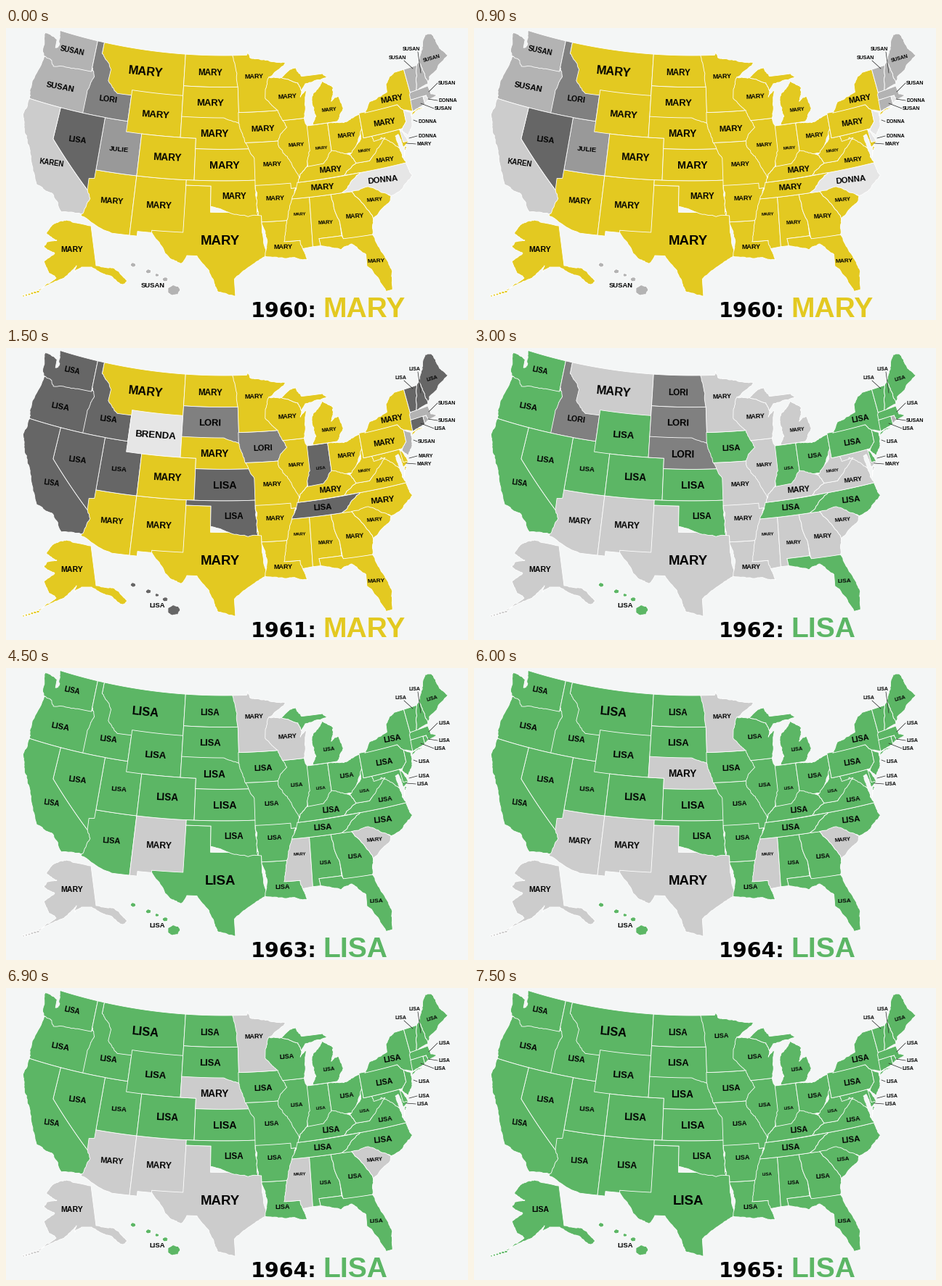
A matplotlib script for the animation above (8000 ms loop, 636 px wide and 403 px high).

```python
import numpy as np
import matplotlib.pyplot as plt
from matplotlib.animation import FuncAnimation
from matplotlib.patches import Polygon

W, H, DPI = 636, 403, 100
BG = "#f4f6f6"
YELLOW, GREEN = "#e3c921", "#5cb665"
GREYS = {"MARY": "#cccccc", "SUSAN": "#b3b3b3", "LORI": "#808080",
         "LISA": "#666666", "JULIE": "#999999", "KAREN": "#cccccc",
         "DONNA": "#e6e6e6", "BRENDA": "#e6e6e6"}

fig = plt.figure(figsize=(W / DPI, H / DPI), dpi=DPI, facecolor=BG)
ax = fig.add_axes([0, 0, 1, 1])
ax.set_xlim(0, W)
ax.set_ylim(H, 0)
ax.axis("off")

parts, labels = {}, {}


def conic(pts):
    """Equal-area conic from west longitude and latitude to the stage,
    bent slightly towards the outer edges."""
    lon, lat = pts.T
    n, c = 0.602835, 1.35122
    rho = np.sqrt(c - 2 * n * np.sin(np.radians(lat))) / n
    a = np.radians(n * (98.4 - lon))
    x = 300.4 + 815 * rho * np.sin(a)
    y = 815 * rho * np.cos(a) - 858.5
    u = (x - 300) / 280
    west, east = np.minimum(u, 0), np.maximum(u, 0)
    return np.column_stack([
        x + 3 * west * (y / 150 - 0.6) - 2 * east**2,
        y - 8 * u**2 * (1 - y / 240) + (y - 200) / 100])


def edge(a, b, place):
    """Surveyed or long borders run straight, rivers and coasts wander.
    The wander depends on the two ends only, so neighbours share it."""
    p, q = sorted((tuple(a), tuple(b)))
    p, q = np.array(p), np.array(q)
    t = np.linspace(0, 1, 13)[:, None]
    xy = place(p + (q - p) * t)
    d = xy[-1] - xy[0]
    size = np.hypot(*d)
    if np.abs(q - p).min() > 0.12 and size < 54:
        rng = np.random.default_rng(int(100 * (7 * p + 13 * q).sum()))
        walk = np.r_[0, rng.normal(0, 0.09 * np.sqrt(size), 12).cumsum()]
        walk -= walk[-1] * t[:, 0]
        xy = xy + np.outer(walk, [-d[1], d[0]]) / size
    return xy if tuple(a) == tuple(p) else xy[::-1]


def piece(key, *pts, place=conic):
    p = np.reshape(pts, (-1, 2)).astype(float)
    xy = np.vstack([edge(a, b, place) for a, b in zip(p, np.roll(p, -1, 0))])
    patch = Polygon(xy, closed=True, ec="white", lw=0.6, joinstyle="round")
    parts.setdefault(key, []).append(ax.add_patch(patch))


def blob(key, x, y, r):
    a = np.arange(0, 2 * np.pi, 0.9)
    piece(key, *np.column_stack([x + r * np.cos(a),
                                 y + 0.8 * r * np.sin(a)]).ravel(),
          place=np.array)


def write(x, y, size, rot=0, ha="center", font="Liberation Sans"):
    return ax.text(x, y, "", family=font, weight="bold", size=size * 72 / DPI,
                   rotation=rot, ha=ha, rotation_mode="anchor", zorder=5)


def tag(key, x, y, size, rot=0, ha="center"):
    labels[key] = write(x, y + 0.345 * size, size, rot, ha)


def state(key, label, *pts):
    """Label is x, y and size; its tilt follows the curve of the map."""
    piece(key, *pts)
    x, y, size = label
    tag(key, x, y, size, 0.06 * (x - 300) * (1 - y / 400))


def box(key, label, w, n, e, s):
    state(key, label, w, n, e, n, e, s, w, s)


# Later states cover the rough sides of earlier ones.
# West
state("OR", (74, 81, 11.2), 123.9, 46.2, 116.5, 46.1, 116.5, 42, 124.2, 42,
      124.5, 42.8)
state("WA", (90, 31, 9.8), 124.7, 48.35, 122.8, 48.1, 122.7, 47.3,
      122.3, 47.6, 122.5, 48.4, 122.76, 49, 117.03, 49, 117.03, 46, 119, 45.95,
      122.3, 45.55, 122.9, 46.1, 124, 46.25)
box("MT", (192, 60, 16.5), 116.05, 49, 104.05, 44.4)
state("AZ", (145, 238, 11), 114.8, 37, 109.05, 37, 109.05, 31.33,
      111.07, 31.33, 114.8, 32.5)
box("UT", (155, 167, 9.5), 114.05, 42, 109.05, 37)
state("ID", (140, 98, 10.6), 117.03, 49, 116.05, 49, 116.05, 47.9,
      114.4, 46.6, 114.5, 45.5, 113, 44.45, 111.05, 44.5, 111.05, 42,
      117.03, 42, 117.03, 44, 116.5, 45.6, 117.03, 46.4)
box("WY", (205, 119, 13.3), 111.05, 45, 104.05, 41)
state("NV", (98, 154, 11), 120, 42, 114.05, 42, 114.05, 36.2, 114.7, 36.1,
      114.63, 35, 120, 39)
state("CA", (62, 186, 9.6), 124.2, 42, 120, 42, 120, 39, 114.63, 35,
      114.14, 34.26, 114.7, 32.72, 117.12, 32.53, 118.5, 34, 120.6, 34.5,
      122.4, 37.4, 123.8, 39.2, 124.4, 40.3)
state("NM", (210, 244, 12.3), 109.05, 37, 103, 37, 103, 31.78, 108.2, 31.78,
      108.2, 31.33, 109.05, 31.33)
box("CO", (222, 178, 13.5), 109.05, 41, 102.05, 37)

# Plains
box("ND", (281, 61, 11.6), 104.05, 49, 96.5, 45.94)
box("SD", (281, 103, 13), 104.05, 45.94, 96.45, 42.5)
box("IA", (354, 138, 11.3), 96.5, 43.5, 90.2, 40.59)
box("MO", (366, 187, 9), 95.8, 40.59, 89.2, 36)
state("TX", (295, 293, 18.7), 103, 36.5, 100, 36.5, 100, 34, 94.04, 34,
      94.04, 32, 93.6, 29.8, 95.2, 29, 97.3, 27.6, 97.2, 25.95, 99.1, 26.4,
      99.6, 27.6, 101.4, 29.8, 102.5, 29.8, 103.1, 29, 104.5, 29.6,
      106.6, 31.8, 106.6, 32, 103.06, 32)
state("NE", (287, 146, 13.5), 104.05, 43, 98.5, 43, 96.5, 42.5, 95.8, 40.9,
      95.3, 40, 102.05, 40, 102.05, 41, 104.05, 41)
state("KS", (301, 189, 14.3), 102.05, 40, 95.3, 40, 94.61, 39.1, 94.62, 37,
      102.05, 37)
state("OK", (314, 232, 11.6), 103, 37, 94.62, 37, 94.45, 33.65, 97.2, 33.8,
      100, 34.56, 100, 36.5, 103, 36.5)

# Midwest
state("MN", (341, 66, 9), 97.2, 49, 95.15, 49, 95, 49.35, 94.6, 48.7,
      92, 48.35, 89.6, 48, 92.1, 46.75, 91.2, 43.5, 96.45, 43.5, 96.5, 45.94)
box("IN", (434, 165, 6.2), 88, 41.74, 84.8, 37.8)
state("IL", (400, 161, 7.8), 90.65, 42.5, 87.8, 42.5, 87.53, 41.7,
      87.53, 39.35, 88.1, 37.9, 89.1, 37, 90.2, 38.7, 91.4, 40, 91.1, 41.2,
      90.2, 41.8)
state("WI", (387, 94, 9), 92.1, 46.75, 90.4, 46.6, 88.1, 45.9, 87.7, 45.1,
      88, 44.55, 87.1, 45.1, 87.8, 42.5, 90.65, 42.5, 91.2, 43.5, 92.8, 44.75,
      92.7, 45.6)
state("MI", (445, 112, 7.3), 86.8, 41.76, 83.45, 41.73, 82.45, 42.9,
      82.9, 44.05, 83.9, 43.7, 83.4, 45, 84.7, 45.75, 86.2, 44.7, 86.5, 43.7,
      86.2, 42.5)
piece("MI", 90.4, 46.6, 88.2, 47.4, 87.5, 46.5, 84.6, 46.45, 84, 46,
      87, 45.75, 87.7, 45.1, 88.1, 45.9)
state("OH", (469, 148, 8.8), 84.8, 41.7, 82.7, 41.5, 80.52, 41.97,
      80.52, 40.6, 82.2, 38.5, 84.8, 38.7)

# South
state("LA", (381, 302, 9), 94.04, 33, 91, 33, 91.4, 31, 89.75, 31, 89.5, 30,
      89.1, 29.1, 91.3, 29.4, 93.85, 29.72, 93.5, 31.1)
state("AR", (370, 234, 9), 94.62, 36.5, 90.3, 36.5, 90.3, 36, 89.7, 36,
      91.1, 33, 94.04, 33, 94.04, 33.6, 94.45, 33.65)
state("MS", (404, 257, 6.2), 90.3, 35, 88.2, 35, 88.4, 30.3, 89.55, 30.2,
      89.75, 31, 91.6, 31, 91.1, 33)
state("AL", (440, 268, 7.3), 88.2, 35, 85.6, 35, 85, 32.3, 85, 31, 87.6, 31,
      87.5, 30.3, 88.4, 30.3)
state("GA", (480, 259, 8.8), 85.6, 35, 83.1, 35, 81.1, 32.1, 81.5, 30.65,
      84.9, 30.6, 85, 32.3)
state("FL", (510, 321, 8.4), 87.6, 31, 85, 31, 84.86, 30.7, 81.5, 30.65,
      80.55, 28.4, 80.05, 26.9, 80.4, 25.2, 81.1, 25.15, 82.7, 27.8,
      82.6, 28.9, 84, 30.1, 85.3, 29.7, 87.5, 30.3)
state("NC", (519, 209, 11.4), 84.3, 35, 81, 34.9, 78.55, 33.87, 76.5, 34.7,
      75.55, 35.25, 75.9, 36.55, 81.68, 36.59)
state("SC", (508, 236, 7.8), 83.1, 35, 81, 35.15, 78.55, 33.87, 79.2, 33.2,
      81.1, 32.1)
state("MD", (565, 160, 7), 79.48, 39.72, 75.79, 39.72, 75.05, 38.45, 75.8, 38,
      76.1, 39.3, 76.5, 39.2, 76.3, 38.1, 77.2, 38.4, 79.48, 39.2)
state("VA", (522, 181, 8.8), 83.67, 36.6, 75.9, 36.55, 76.3, 37.9, 77.1, 38.7,
      78.3, 39.4, 80.3, 37.5, 81.97, 37.54)
piece("VA", 75.95, 37.15, 75.4, 38, 75.7, 38)
state("TN", (436, 219, 11.3), 90.3, 35, 84.3, 35, 81.68, 36.59, 89.5, 36.5)
state("KY", (447, 195, 10.8), 89.4, 36.5, 83.67, 36.6, 81.97, 37.54,
      82.6, 38.4, 84.8, 39.1, 86, 38, 88.1, 37.9, 89.1, 37)
state("WV", (494, 169, 6.4), 80.52, 40.64, 80.52, 39.72, 79.48, 39.72,
      79.3, 39.2, 77.8, 39.3, 80.3, 37.5, 81.97, 37.54, 82.6, 38.4,
      80.85, 39.7)

# Northeast
state("PA", (521, 130, 10.5), 80.52, 42.1, 75.35, 42, 74.7, 41.35,
      74.75, 40.2, 75.5, 39.72, 80.52, 39.72)
state("NY", (532, 97, 10.8), 79.76, 42, 78.9, 42.9, 76.3, 43.4, 76.2, 44.1,
      74.8, 45, 73.35, 45, 73.3, 42.5, 73.6, 41, 74.7, 41.35, 75.35, 42)
piece("NY", 74, 40.6, 71.9, 41.07, 73.7, 40.9)
state("ME", (587, 41, 7), 71.08, 45.3, 70.1, 46.4, 69.2, 47.45, 68.3, 47.3,
      67.8, 45.7, 67, 44.85, 70.2, 43.6, 70.7, 43)
piece("DE", 75.79, 39.72, 75.05, 38.45, 75.7, 38.46)
piece("NJ", 74.7, 41.35, 73.95, 41, 74.1, 39.75, 74.9, 38.95, 75.5, 39.5,
      74.75, 40.2)
piece("VT", 73.35, 45, 71.5, 45, 72.46, 42.73, 73.3, 42.75)
piece("NH", 71.5, 45, 71.08, 45.3, 70.7, 43, 72.46, 42.73)
piece("MA", 73.3, 42.75, 70.8, 42.8, 70.7, 42, 69.95, 41.7, 71.2, 41.5,
      71.35, 42.02, 73.5, 42.05)
piece("CT", 73.5, 42.05, 71.8, 42.05, 71.8, 41.3, 73.6, 41)
piece("RI", 71.8, 42.02, 71.35, 42.02, 71.2, 41.5, 71.8, 41.35)

# Insets, in stage pixels
piece("AK", 66, 270, 83, 265, 117, 273, 124, 328, 147, 331, 167, 349, 161, 354,
      140, 341, 118, 330, 104, 330, 95, 337, 97, 328, 80, 345, 45, 363, 45, 361,
      69, 345, 59, 338, 52, 322, 67, 311, 51, 302, 57, 295, 70, 293, 55, 283,
      place=np.array)
for x in range(24, 46, 4):
    blob("AK", x, 377 - 0.3 * x, 1 + x / 30)
for x, y, r in ((175, 327, 4), (196, 336, 4), (208, 341, 3), (219, 347, 4),
                (231, 362, 9)):
    blob("HI", x, y, r)
tag("AK", 91, 305, 10.5)
tag("HI", 219, 355, 9.4, ha="right")

# Labels out at sea, each with a line to its state
for key, ha, x, y, tip in (("VT", "right", 551, 41, (560, 56)),
                           ("NH", "right", 570, 29, (571, 62)),
                           ("MA", "left", 595, 76, (582, 88)),
                           ("RI", "left", 595, 100, (581, 98)),
                           ("CT", "left", 590, 111, (571, 104)),
                           ("NJ", "left", 567, 129, (561, 127)),
                           ("DE", "left", 567, 149, (555, 152)),
                           ("MD", "left", 565, 160, (551, 159))):
    if key == "MD":
        labels[key].remove()
    tag(key, x, y, 7, ha=ha)
    start = (x - 3, y + 4) if ha == "right" else (x - 1, y)
    ax.plot(*zip(start, tip), color="#222222", lw=0.5)

year_text = write(337, 399, 28.5, ha="left", font="DejaVu Sans")
top_text = write(436, 399, 39, ha="left")

# Leading name of each year, and the states that differ from it
YEARS = (
    ("MARY", {"SUSAN": "WA OR HI ME VT NH MA CT", "KAREN": "CA", "LISA": "NV",
              "LORI": "ID", "JULIE": "UT", "DONNA": "NC RI NJ DE"}),
    ("MARY", {"LISA": "WA OR ID NV CA UT KS OK IN TN HI ME VT NH CT",
              "SUSAN": "MA RI NJ", "LORI": "SD IA", "BRENDA": "WY"}),
    ("LISA", {"MARY": "MT AZ NM TX AK MN WI MI IL MO AR LA MS AL GA SC VA WV "
                      "KY MD", "LORI": "ID ND SD NE", "SUSAN": "RI"}),
    ("LISA", {"MARY": "MN WI NM SC MS AK"}),
    ("LISA", {"MARY": "AZ NM TX MN NE SC MS AK"}),
    ("LISA", {}),
)


def update(i):
    k = i // 3
    top, others = YEARS[k]
    accent = YELLOW if top == "MARY" else GREEN
    names = {s: n for n, group in others.items() for s in group.split()}
    for s, patches in parts.items():
        name = names.get(s, top)
        labels[s].set_text(name)
        for p in patches:
            p.set_facecolor(accent if name == top else GREYS[name])
    year_text.set_text(f"{1960 + k}:")
    top_text.set_text(top)
    top_text.set_color(accent)
    return []


anim = FuncAnimation(fig, update, frames=16, interval=500, repeat=True,
                     repeat_delay=0, blit=False)
plt.show()
```
